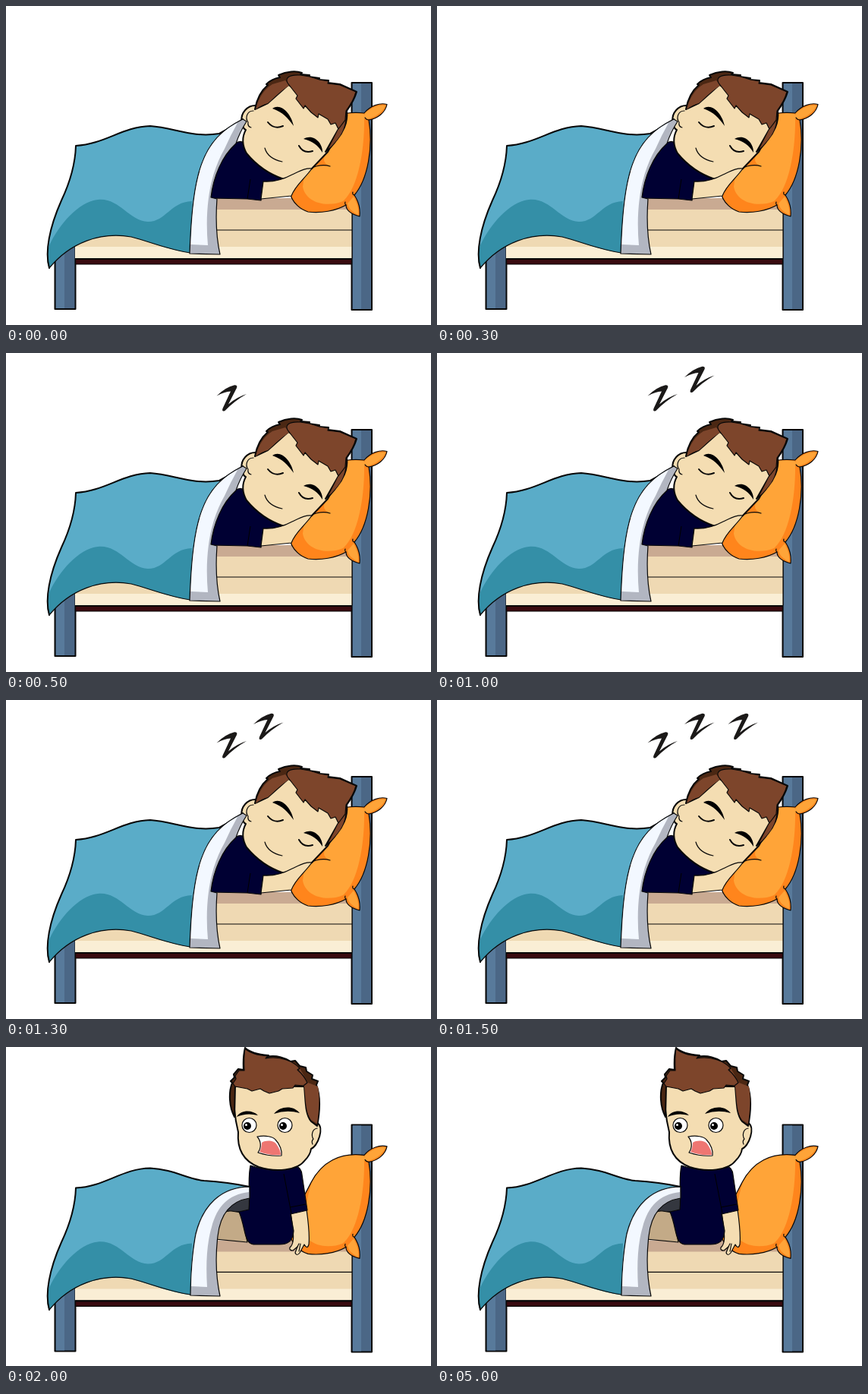
An HTML page that plays this animation: 560x420 px, repeating every 7000 ms.

```html
<!DOCTYPE html>
<html lang="en">
<head>
<meta charset="utf-8">
<title>Asleep and awake</title>
<style>
html, body { margin: 0; width: 100%; height: 100%; overflow: hidden; background: #fff; }
svg { display: block; width: 100vw; height: 100vh; }
.ink { stroke: #080808; stroke-width: 1.2; stroke-linejoin: round; stroke-linecap: round; }
.bold { stroke-width: 2; }
.line { fill: none; }
.skin { fill: #f4ddb2; }
.hair { fill: #7d452b; }
.dark { fill: #4b2713; }
.shirt { fill: #000033; }
.sheet { fill: #5aacc8; }
.wave { fill: #348fa7; }
.fold { fill: #b2b6c1; }
.white { fill: #f3f8ff; }
.shade { fill: #ff851c; }
.pillow { fill: #ffa438; }
</style>
</head>
<body>
<svg viewBox="0 0 560 420">
  <defs>
    <path id="zed" fill="#1b1918" d="M277.500 56.500 Q289 45 301 42.200 Q305.500 42 304 46 L293 67.500 Q304 58 317 54 Q301 63 288.500 76 Q284 78 285.500 73 L296 50.500 Q288 51 277.500 56.500Z"/>
    <path id="wave" class="wave" d="M57 315 C70 288 95 258 121 255 C149 252 162 283 187 284 C211 284 216 258 245 257 L243 325 C214 321 192 311 165 304 C125 297 85 311 57 345 C53 338 54 325 57 315Z"/>
  </defs>

  <g id="bed">
    <g class="ink bold">
      <path fill="#4b6786" d="M455.500 101H482V400H455.500Z"/>
      <path fill="#4b6786" d="M64.500 290H91.500V399H64.500Z"/>
    </g>
    <path fill="#587a9b" d="M457 102H468V399H457ZM66 290H77V398H66Z"/>
    <path fill="#efd9b3" d="M91 254H456V332H91Z"/>
    <path fill="#c9aa92" d="M250 253H456V268H250Z"/>
    <path fill="#faeed5" d="M91 317H456V332H91Z"/>
    <path class="ink line" d="M250 295H456M456 254V332"/>
    <path class="ink" fill="#3a0b10" d="M91.500 332.500H455.500V340H91.500Z"/>
    <path class="ink line bold" d="M92 333H455"/>
    <path class="ink shade" d="M472 141 C480 131 493 127 502 129.500 C500 140 490 148 478 150 C484 185 477 228 459 249 C465 258 467 268 466 277 C455 274 448 269 448 262 C434 270 415 273 398 271 C388 268 378 259 375 249 C380 224 390 198 402 177 C416 150 440 137 472 141Z"/>
    <path class="pillow" d="M471 142 C440 138 417 151 403 177 C397 193 394 216 391 238 C395 259 422 266 444 257 C464 240 473 190 472 143Z"/>
    <path class="pillow" d="M473 141 C482 133 492 130 500 131 C497 139 487 146 478 148.500 L471 148ZM458 251C463 260 465 268 464 275C456 271 451 266 450 260Z"/>
    <path class="ink line" d="M478 150 Q475 150 473 147M459 249 Q456 248 457 245M448 262 Q446 261 447 258"/>
  </g>

  <g id="asleep">
    <path class="shade" d="M446 150 L401 214 Q413 207 426 211 Q415 205 421 196 C431 183 440 169 446 150Z"/>
    <path class="ink line" d="M400 214 Q416 207 427 211"/>
    <path class="ink shirt" d="M302 181 C312 174 319 183 317 194 L345 210 L372 226 L363 231 L339 231 L336 256 L318 254 L270 253 C273 226 283 199 302 181Z"/>
    <path class="line" stroke="#000" d="M322 228 L318 254"/>
    <path class="ink bold skin" d="M330 131 C318 130 309 141 310.500 152 Q312 162 316 163 C310 174 312 185 317 194 C331 211 348 222 366 228 Q384 229 403 214 L424 192 L447 151 L440 112 L372 98Z"/>
    <path class="ink line" d="M326 138 C317 138 315 148 319 153 Q318 159 323 160"/>
    <path class="ink dark bold" d="M328 136 C331 119 339 109 345 104 L343 103 C350 96 356 95 361 94 L359 91 C370 86 382 85 390 88 L388 90 L400 91 L399 93 L413 95 L412 97 L425 98 L424 101 L440 103 L462 113 Q459 124 449 138 C451 154 443 168 436 176 Q429 186 421 192 L438 162 L436 130 L372 104 L345 128Z"/>
    <path class="hair" d="M329 136 C333 120 341 109 351 103 L368 98 L374 104 C363 111 355 119 345 128 Q337 130 329 136ZM438 162 L447 151 C446 166 436 178 425 188Z"/>
    <path class="ink hair" d="M373 104 C365 95 373 90 388 91 L400 93 L413 97 L425 99 L424 102 L440 104 L461 113 Q458 125 448 138 L447 150 L438 162 L434 154 L428 156 L424 149 L412 142 L411 147 L402 140 L394 131 L392 135 L382 122 L384 118Z"/>
    <path d="M351 135 C362 127 376 142 379 158 C371 147 365 140 351 135ZM392 175 C405 167 418 181 417 193 C411 183 404 178 392 175Z"/>
    <path class="ink line bold" d="M345 153 Q353 163 365 158M386 184 Q392 195 404 191"/>
    <path class="ink line" d="M341 187 Q345 201 364 205"/>
    <path class="ink skin" d="M339 231 C354 232 366 228 377 222 C388 217 395 213 403 214 C394 227 381 236 376 250 L336 254Z"/>
    <path class="sheet" d="M92 184 C130 182 153 159 190 158 C222 160 245 174 281 168 Q297 160 312 149 C256 176 246 222 243 325 C214 321 192 311 165 304 C125 297 85 311 57 345 C51 324 57 292 73 256 Q91 218 92 184Z"/>
    <use href="#wave"/>
    <path class="ink line bold" d="M312 149 Q297 160 281 168 C245 174 222 160 190 158 C153 159 130 182 92 184 Q91 218 73 256 C57 292 51 324 57 345"/>
    <path class="ink line" d="M57 345 C85 311 125 297 165 304 C192 311 214 321 243 325"/>
    <path class="ink fold" d="M312 149 C256 176 246 222 242 326 L282 327 C277 305 276 282 278 254 L270 252 C273 226 284 198 303 181 Q308 166 317 152Z"/>
    <path class="white" d="M305 154 C258 178 247 225 243.500 314 L266 315 C262 270 267 224 288 188 Q296 170 305 154Z"/>
  </g>

  <g id="awake">
    <path fill="#34373f" class="ink" d="M290 217 Q300 200 322 196 V217Z"/>
    <path fill="#c3aa87" class="ink" d="M276 253 C277 230 284 214 297 216 L310 218 L318 257Z"/>
    <path class="ink skin" d="M375 217 L396 214 C399 235 400 250 399 260 Q397 267 393 260 L387 271 Q383 276 381 271 L384 263 L378 268 Q373 268 374 264 C381 258 379 246 375 217Z"/>
    <path class="ink line" d="M388 259 L386 269M384 263 L386 259"/>
    <path class="ink shirt" d="M322 156 Q346 164 365 160 C375 151 389 156 390 168 L397 215 L375 220 L379 242 C378 257 370 260 360 260 L326 260 C313 258 316 238 307 217 L320 214 C322 195 318 176 322 156Z"/>
    <path class="line" stroke="#000" d="M366 167 L376 219M374 211 L395 207"/>
    <path class="ink bold skin" d="M301 52 C299 75 302 96 306 112 C304 137 315 151 333 158 C355 165 384 163 394 149 Q401 142 402 134 C411 131 420 105 410 100 L398 45Z"/>
    <path class="ink line" d="M410 107 C403 108 402 117 405 121 Q402 124 404 128"/>
    <path class="ink dark bold" d="M301 92 C294 79 293 60 298 47 L296 45 L301 40 L300 36 L306 29 L313 30 Q312 13 315 1 C322 8 333 10 346 11 L343 13 C357 10 369 15 375 19 L381 18 L387 25 L395 27 L396 32 L404 37 L403 42 L411 45 L409 50 C415 65 413 88 410 104 L402 98 C394 88 395 72 393 52 L302 51Z"/>
    <path class="hair" d="M387 28 L398 47 L411 52 C414 68 412 87 410 101 L402 96 C395 87 395 72 393 52 L383 45Z"/>
    <path class="ink hair" d="M302 52 L299 48 L303 42 L302 38 L307 31 L314 31 Q313 14 315 2 C322 9 333 11 345 12 L342 15 C362 11 380 20 387 28 L384 30 Q393 38 397 47 L392 51 L381 50 L378 54 L364 55 L359 58 L347 61 L340 58 L335 55 L324 58 L318 55Z"/>
    <path d="M304 92 C310 82 325 83 332 90 Q317 86 304 92ZM353 88 C362 77 379 77 387 87 Q370 82 353 88Z"/>
    <g class="ink" fill="#fff">
      <circle cx="320.500" cy="103" r="9.500"/>
      <circle cx="367.500" cy="103" r="9.500"/>
    </g>
    <circle cx="318" cy="104" r="5"/><circle cx="365" cy="104" r="5"/>
    <g fill="#fff"><circle cx="316.500" cy="102.500" r="1.500"/><circle cx="363.500" cy="102.500" r="1.500"/></g>
    <path class="ink" fill="#fff" d="M331 118 C342 116 352 118 355 122 C361 128 364 137 363 143 C352 144 341 142 332 139 C337 132 336 124 331 118Z"/>
    <path fill="#ee7672" d="M337 126 C343 122 354 123 357 129 Q362 136 362 142 C352 143 342 141 334 138 Q337 133 337 126Z"/>
    <path class="sheet" d="M92 185.500 C130 184 153 160 190 159.500 C221 161 239 174 261 176 Q293 178 321 184 C283 184 259 209 250 246 Q244 276 243 326 C214 322 192 312 165 305 C125 298 85 312 57 346 C51 325 57 293 73 257 Q91 219 92 185.500Z"/>
    <use href="#wave" y="1.400"/>
    <path class="ink line bold" d="M321 184 Q293 178 261 176 C239 174 221 161 190 159.500 C153 160 130 184 92 185.500 Q91 219 73 257 C57 293 51 325 57 346"/>
    <path class="ink line" d="M57 346 C85 312 125 298 165 305 C192 312 214 322 243 326"/>
    <path class="ink fold" d="M321 184 C283 184 259 209 250 246 Q244 276 243 327 L282 328 C276 300 276 274 279 249 C282 222 295 203 321 199Z"/>
    <path class="white" d="M320 185 C284 185 260 210 251 246 Q245 276 244 315 L265 316 C263 283 265 257 271 237 C278 210 293 194 320 191Z"/>
  </g>

  <g id="snore">
    <use href="#zed"/>
    <use href="#zed" x="48.500" y="-24.500"/>
    <use href="#zed" x="106" y="-24.500"/>
  </g>
</svg>
<script>
const LOOP = 7000, STEP = 500, WAKE = 2000;
const el = id => document.getElementById(id);
const show = (node, on) => node.setAttribute("visibility", on ? "visible" : "hidden");
const zeds = [...el("snore").children];

function draw(ms) {
  const t = ms % LOOP;
  const awake = t >= WAKE;
  show(el("asleep"), !awake);
  show(el("awake"), awake);
  el("bed").setAttribute("transform", `translate(0 ${awake ? 1.4 : 0})`);
  zeds.forEach((z, i) => show(z, !awake && t >= (i + 1) * STEP));
}

const start = performance.now();
function tick() {
  draw(performance.now() - start);
  requestAnimationFrame(tick);
}
tick();
</script>
</body>
</html>
```
